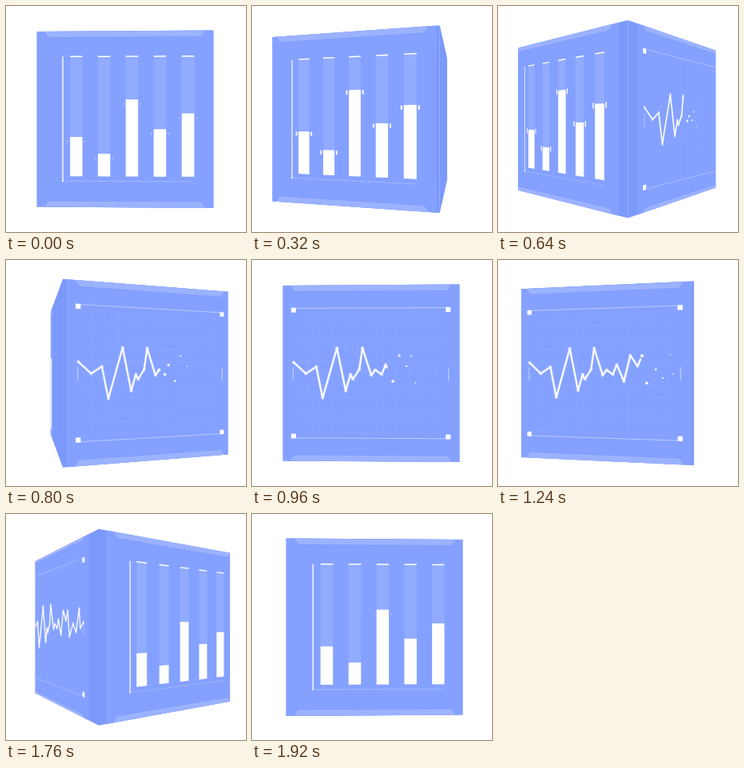
Write an HTML page that moves like this. It is 300x283 px and loops after 1960 ms.

```html
<!DOCTYPE html>
<html lang="en">
<head>
<meta charset="utf-8">
<title>Rotating chart cube</title>
<style>
  html, body { margin: 0; width: 100%; height: 100%; overflow: hidden; background: #fff; }
  svg { display: block; width: 100vw; height: 100vh; }
</style>
</head>
<body>
<svg id="stage" viewBox="0 0 300 283"></svg>
<script>
const stage = document.getElementById('stage');
const LOOP = 1960, STEP = 40;
const CX = 151, CY = 141.7;
// Charts float LIFT units in front of the cube walls
const HALF = 110.5, CAMERA = 530, LIFT = 11;
const LIFT_SCALE = (CAMERA - HALF - LIFT) / (CAMERA - HALF);
const PANEL = '#85a1ff', WALL = '#7b98fb';

// Cube rotation: time in ms, angle in degrees
const TURN = [
  [0, 1.35], [320, 14.7], [560, 33], [640, 41.3], [760, 64.5], [880, 88.4], [960, 91.35],
  [1240, 99.8], [1560, 118], [1680, 131.3], [1800, 155], [1920, 178.6], [1960, 181.35]
];
const BARS = [56.5, 32.6, 110.4, 67.8, 90.3];
const BASE = 71.8, TOP = -78.7;
const SIGNAL = [
  [-96.5, -13.5], [-81, .5], [-68, -8], [-60, 31], [-42, -31.5], [-31, 22], [-25, 1.5],
  [-22, 7.5], [-14, -4.5], [-10, -31.5], [1, 2.5], [6, -4], [14, 1.5], [19, -10.5],
  [28, 10.2], [36, -22], [45, -8.8], [50.6, -21.4], [56.2, 12.2], [67.3, -4.5],
  [76, 6], [85, -22.5], [88, 1.3], [97, -6]
];

const clamp = x => Math.max(0, Math.min(1, x));
const slope = i => (TURN[i + 1][1] - TURN[i][1]) / (TURN[i + 1][0] - TURN[i][0]);

function tangent(i) {
  if (i === 0 || i === TURN.length - 1) return slope(0);
  const a = slope(i - 1), b = slope(i);
  return 2 * a * b / (a + b);
}

// Monotone cubic through the TURN keys
function angleAt(t) {
  let i = 0;
  while (t > TURN[i + 1][0]) i++;
  const span = TURN[i + 1][0] - TURN[i][0];
  const p = (t - TURN[i][0]) / span, q = 1 - p;
  return TURN[i][1] * q * q * (1 + 2 * p) + TURN[i + 1][1] * p * p * (3 - 2 * p)
    + span * (tangent(i) * p * q * q - tangent(i + 1) * p * p * q);
}

// Maps points of one face to the stage
function projector(rad, depth, scale) {
  const c = Math.cos(rad), s = Math.sin(rad);
  return (u, v) => {
    u *= scale;
    const k = (CAMERA - HALF) / (CAMERA - depth * c - u * s);
    return [CX + (u * c - depth * s) * k, CY + v * scale * k];
  };
}

function pen(project, weight) {
  const path = points => 'M' + points
    .map(([u, v]) => project(u, v).map(n => n.toFixed(2)).join(' ')).join('L');
  const fill = (points, color, alpha = 1, extra = '') =>
    `<path d="${path(points)}Z" fill="${color}" fill-opacity="${alpha}" ${extra}/>`;
  return {
    path, fill,
    rect: (u, v, w, h, alpha = 1, color = '#fff') =>
      fill([[u, v], [u + w, v], [u + w, v + h], [u, v + h]], color, alpha),
    line: (points, width, alpha = 1, extra = '') =>
      `<path d="${path(points)}" fill="none" stroke="#fff" stroke-width="${width * weight}"
        stroke-opacity="${alpha}" stroke-linejoin="round" stroke-linecap="round" ${extra}/>`,
    dot(u, v, r, alpha = 1) {
      const [x, y] = project(u, v);
      return `<ellipse cx="${x}" cy="${y}" rx="${r * weight}" ry="${r}" fill="#fff" fill-opacity="${alpha}"/>`;
    }
  };
}

function tabs({ fill }) {
  const edge = 'stroke="#7490f4" stroke-opacity=".5" stroke-width=".8"';
  return [-1, 1].map(side => fill(
    [[-102, 111 * side], [-95.5, 102.8 * side], [95.5, 102.8 * side], [102, 111 * side]],
    '#9fb5ff', .85, edge)).join('');
}

function barChart({ rect, line, dot }, t) {
  const clock = t < 1200 ? t + LOOP : t;
  const grow = 1 - (1 - clamp((clock - 1325) / 1275)) ** 3;
  const mark = clamp((clock - 1870) / 530);
  let out = rect(-78.2, TOP, 1.5, BASE + 6 - TOP, .9) + dot(-77.4, 77.6, 1)
    + line([[-77, 77.8], [86, 77.8]], .8, .55, 'stroke-dasharray="1 2.4"');
  BARS.forEach((full, i) => {
    const u = -68.2 + 34.9 * i, top = BASE - full * grow;
    out += rect(u, TOP, 15.5, BASE - TOP, .1) + rect(u, TOP - .7, 15.5, 1.5)
      + rect(u, top, 15.5, full * grow);
    if (!mark) return;
    const h = 7 * mark, mid = top + 6.5 - 4.5 * mark;
    for (const m of [u - 2.9, u + 18.4])
      out += rect(m - 1, mid - h / 2, 2, h, clamp(.4 + mark));
  });
  return out;
}

function signalChart({ rect, line, dot }, t) {
  const tau = t - 640;
  const head = Math.min(97, -10 + .092 * tau + .00001 * tau * tau);
  let out = '';
  for (let i = -5; i <= 5; i++)
    out += line([[i * 16, -78], [i * 16, 78]], .7, .05)
      + line([[-92, i * 15], [92, i * 15]], .7, .05);
  for (const side of [-1, 1]) {
    out += line([[-93, 81.6 * side], [93, 81.6 * side]], .8, .55)
      + line([[97.2 * side, -7], [97.2 * side, 9]], .9, .6);
    for (const u of [-96.7, 96.7]) out += rect(u - 3, 79.3 * side - 3, 6, 6);
  }
  const drawn = [];
  SIGNAL.forEach(([u, v], i) => {
    if (u <= head) {
      drawn.push([u, v]);
      out += dot(u, v, 2.3, .38);
      return;
    }
    const [pu, pv] = SIGNAL[Math.max(0, i - 1)];
    if (pu <= head) drawn.push([head, pv + (v - pv) * (head - pu) / (u - pu)]);
    const r = 2.1 - .036 * (u - head);
    if (r > .3) out += dot(u, v, r);
  });
  return out + line(drawn, 4, .12) + line(drawn, 2.2);
}

function face(index, turn, t) {
  const rad = (turn - index * 90) * Math.PI / 180;
  if (Math.cos(rad) * CAMERA <= HALF) return '';
  const wall = pen(projector(rad, HALF, 1), 1);
  const chart = pen(projector(rad, HALF + LIFT, LIFT_SCALE), Math.cos(rad));
  const square = [[-HALF, -HALF], [HALF, -HALF], [HALF, HALF], [-HALF, HALF]];
  const panel = chart.rect(-HALF, -HALF - 10, 2 * HALF, 2 * HALF + 20, 1, PANEL);
  const content = index % 2 ? signalChart(chart, t) : barChart(chart, t);
  return `<clipPath id="face${index}"><path d="${wall.path(square)}Z"/></clipPath>`
    + wall.fill(square, WALL)
    + `<g clip-path="url(#face${index})">${panel}${tabs(chart)}${content}</g>`;
}

function draw(now) {
  const t = Math.floor((now % LOOP) / STEP) * STEP;
  const turn = angleAt(t);
  stage.innerHTML = [0, 1, 2, 3].map(i => face(i, turn, t)).join('');
}

const start = performance.now();
function tick() {
  draw(performance.now() - start);
  requestAnimationFrame(tick);
}
tick();
</script>
</body>
</html>
```
